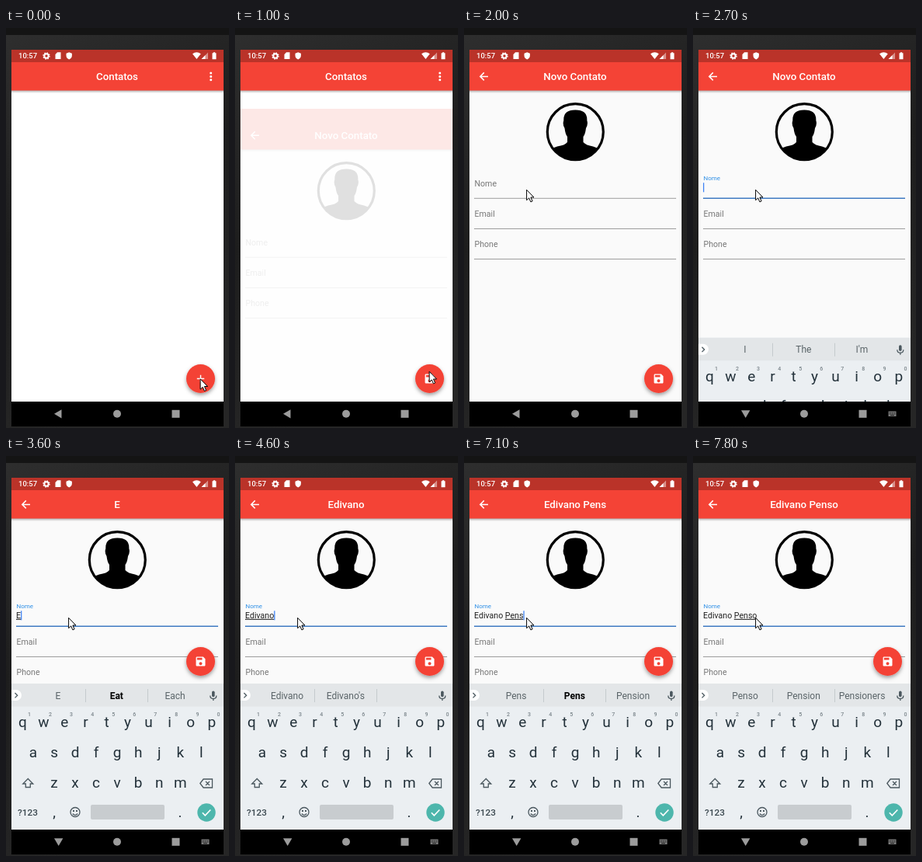
An HTML page that plays this animation: 287 by 515 pixels, repeating every 8 s.

```html
<!DOCTYPE html>
<html lang="pt">
<head>
<meta charset="utf-8">
<title>Contatos</title>
<style>
html, body { margin: 0; width: 100%; height: 100%; overflow: hidden; background: #1b1b1b }
svg { display: block; width: 287px; height: 515px; font-family: Roboto, sans-serif }
text { white-space: pre }
.mid { text-anchor: middle }
.title { font-size: 13.3px; font-weight: 500; fill: #fff; text-anchor: middle }
.field { font-size: 10.6px; fill: #777 }
.key { font-size: 19px; fill: #23313a; text-anchor: middle }
.digit { font-size: 7px; font-weight: 500; fill: #7b858b; text-anchor: middle }
.hint { font-size: 12px; fill: #5a6468; text-anchor: middle }
.line { fill: none; stroke: #4b585f; stroke-width: 1.3 }
#word { text-decoration: underline; text-decoration-thickness: 1px }
</style>
</head>
<body>
<svg viewBox="0 0 287 515">
  <defs>
    <linearGradient id="metal" x1="0" y1="0" x2=".3" y2="1">
      <stop stop-color="#2e2e2e"/><stop offset=".5" stop-color="#1d1d1d"/><stop offset="1" stop-color="#262626"/>
    </linearGradient>
    <linearGradient id="barShade" x2="0" y2="1">
      <stop stop-opacity=".32"/><stop offset="1" stop-opacity="0"/>
    </linearGradient>
    <clipPath id="screen"><path d="M7 28h273v485H7z"/></clipPath>
    <clipPath id="portrait"><circle cx="143.3" cy="133.7" r="36.5"/></clipPath>
    <filter id="drop" x="-50%" y="-50%" width="200%" height="200%">
      <feDropShadow dx="0" dy="2.5" stdDeviation="2.4" flood-opacity=".38"/>
    </filter>
  </defs>

  <path d="M0 0h287v515H0z" fill="#141414"/>
  <path d="M0 9h287v506H0z" fill="url(#metal)"/>

  <g clip-path="url(#screen)">
    <path d="M7 28h273v453H7z" fill="#fff"/>
    <path d="M7 80h273v4H7z" fill="url(#barShade)"/>
    <path d="M7 28h273v52.5H7z" fill="#f44336"/>
    <text class="title" x="143" y="67">Contatos</text>
    <g fill="#fff"><circle cx="263.7" cy="58" r="1.5"/><circle cx="263.7" cy="62.4" r="1.5"/><circle cx="263.7" cy="66.8" r="1.5"/></g>

    <g id="form">
      <path d="M7 28h273v453H7z" fill="#fafafa"/>
      <path d="M7 80h273v4H7z" fill="url(#barShade)"/>
      <path d="M7 28h273v52.5H7z" fill="#f44336"/>
      <path d="M31 62.4H21M25.8 57.4l-5 5 5 5" fill="none" stroke="#fff" stroke-width="1.5"/>
      <text class="title" id="title" x="143" y="67"></text>
      <g clip-path="url(#portrait)">
        <path d="M128.3 119Q127.500 105.500 143.300 105.500T158.300 119Q160 124 157 129Q156 137 153.500 140V147Q157 151 166 152.500Q175 154.500 177 163V175H109V163Q111 154.500 120 152.500Q130 151 133 147V140Q130.500 137 129.500 129Q126.500 124 128.300 119Z"/>
      </g>
      <circle cx="143.3" cy="133.7" r="36" fill="none" stroke="#000" stroke-width="3.2"/>
      <text class="field" id="label" x="13.5"></text>
      <text class="field" x="13.5" y="243">Email</text>
      <text class="field" x="13.5" y="282">Phone</text>
      <path d="M13 258.500h260M13 297.500h260" stroke="#949494" stroke-width=".9"/>
      <path id="rule" d="M13 219.300h260"/>
      <text class="field" id="typed" x="13" y="208.800" style="fill:#222"><tspan id="done"></tspan><tspan id="word"></tspan></text>
      <rect id="caret" y="199.300" width="1.3" height="12" fill="#4285f4"/>
    </g>

    <g id="fab">
      <circle r="18.500" fill="#f44336" filter="url(#drop)"/>
      <path id="plus" d="M-4.700 0h9.400M0-4.700v9.400" stroke="#fff" stroke-width="1.4"/>
      <path id="save" transform="scale(.664) translate(-12 -12)" fill="#fff" d="M17 3H5c-1.110 0-2 .9-2 2v14c0 1.100.89 2 2 2h14c1.100 0 2-.9 2-2V7l-4-4zm-5 16c-1.660 0-3-1.340-3-3s1.340-3 3-3 3 1.340 3 3-1.340 3-3 3zm3-10H5V5h10v4z"/>
    </g>

    <path d="M7 28h273v16H7z" fill="#000" opacity=".24"/>
    <g fill="#fff">
      <text x="16" y="39.400" font-size="9.500" font-weight="500">10:57</text>
      <g fill="none" stroke="#fff"><circle cx="52" cy="36" r="2.700" stroke-width="2"/><circle cx="52" cy="36" r="4" stroke-width="1.400" stroke-dasharray="1.600 1.540"/></g>
      <path d="M63.500 40V34l2.600-2.700H70.500V40zM77.500 32.700l3.700-1.500 3.700 1.500v2.800q0 3.300-3.700 5q-3.700-1.700-3.700-5z"/>
      <path d="M240 33.200q5.400-4 10.800 0l-5.400 6.800zM256.500 35v5h-5zM265.500 32.200h1.300v-1h2.400v1h1.300v8h-5z"/>
      <path d="M260 31.500V40h-8.500z" opacity=".45"/>
    </g>

    <g id="keyboard">
      <path d="M7 293h273v188H7z" fill="#ebeff2"/>
      <path d="M7 293h273v29.500H7z" fill="#e3e6e8"/>
      <path d="M7 301h6a7 7 0 0 1 0 14H7z" fill="#fff"/>
      <path class="line" d="M11.500 305l3.200 3.200-3.200 3.200"/>
      <path d="M102.500 300v17M182.500 300v17" stroke="#c5cacd"/>
      <text class="hint" x="67" y="312.600"></text>
      <text class="hint" x="142.300" y="312.600"></text>
      <text class="hint" x="217.500" y="312.600"></text>
      <path class="line" d="M262.800 308.500q0 4 4 4t4-4M266.800 312.500v2.500"/>
      <rect x="265" y="302.500" width="3.600" height="7.800" rx="1.800" fill="#4b585f"/>
      <g id="keys"></g>
      <path class="line" d="M28.300 415.500l-6.500 6.500h3.500v4.500h6V422h3.500z"/>
      <path class="line" d="M249.800 421.500l4.300-5.500h11.400v11h-11.400zM257 419l5 5M262 419l-5 5"/>
      <text class="mid" x="28" y="463" font-size="11.800" font-weight="500" fill="#38464d">?123</text>
      <circle class="line" cx="89" cy="458.500" r="6"/>
      <path class="line" d="M85.800 460.500q3.200 3.600 6.400 0"/>
      <path d="M86 456h2v2h-2zM90 456h2v2h-2z" fill="#4b585f"/>
      <rect x="109" y="449" width="95" height="19" rx="2" fill="#c8cccf"/>
      <circle cx="258" cy="459" r="11.700" fill="#4db6ac"/>
      <path d="M252.800 459.300l3.500 3.500 7-7.300" fill="none" stroke="#fff" stroke-width="1.600"/>
    </g>

    <path d="M7 481h273v32H7z"/>
    <g fill="#9c9c9c">
      <path id="back" d="M62 496.800l9.500-5.600v11.200z"/>
      <path id="hide" d="M62 492.300h11.400l-5.700 9.700z"/>
      <circle cx="143" cy="496.800" r="5"/>
      <path d="M213.500 491.800h10v10h-10z"/>
      <g id="switcher"><path d="M251.500 493.500h10v6.500h-10z" opacity=".8"/><path d="M252.500 495.300h8M252.500 497h8" stroke="#000" stroke-width=".8" stroke-dasharray="1 .7"/><path d="M254 498.700h5" stroke="#000" stroke-width=".8"/></g>
    </g>
  </g>
  <path id="pointer" d="M.6 .8V14.200L3.700 11.400L5.900 16.400L8.100 15.400L5.900 10.500H10z" fill="#fff" stroke="#000"/>
</svg>
<script>
const $ = id => document.getElementById(id);
const clamp = x => Math.min(1, Math.max(0, x));
const mix = (a, b, p) => a + (b - a) * p;
const smooth = p => p * p * (3 - 2 * p);
const show = (id, on) => $(id).setAttribute('visibility', on ? 'visible' : 'hidden');
const move = (id, x, y) => $(id).setAttribute('transform', `translate(${x} ${y})`);
const hints = document.querySelectorAll('.hint');

function bezier(x1, y1, x2, y2, x) {
  const at = (a, b, s) => 3 * (1 - s) * (1 - s) * s * a + 3 * (1 - s) * s * s * b + s * s * s;
  let lo = 0, hi = 1;
  for (let i = 0; i < 20; i++) {
    const s = (lo + hi) / 2;
    if (at(x1, x2, s) < x) lo = s; else hi = s;
  }
  return at(y1, y2, lo);
}

// Time, field text, three suggestions; a leading * marks the bold one
const typing = [
  [2400, '', 'I', 'The', "I'm"],
  [3600, 'E', 'E', '*Eat', 'Each'],
  [3900, 'Ed', 'Ed', '*Edit', 'Edge'],
  [4100, 'Edi', 'Edi', '*Edit', 'Edited'],
  [4200, 'Ediv', 'Ediv', '*Edit', 'Editions'],
  [4400, 'Ediva', 'Ediva', '*Edit', 'Editing'],
  [4500, 'Edivan', 'Edivan', 'Editing', 'Edit'],
  [4600, 'Edivano', 'Edivano', "Edivano's", ''],
  [5300, 'Edivano ', 'is', 'and', 'I'],
  [5700, 'Edivano P', 'P', '*Per', 'Part'],
  [6000, 'Edivano Pe', 'Pe', '*Peek', 'Pet'],
  [6200, 'Edivano Pen', 'Pen', '*Pen', 'Penny'],
  [7100, 'Edivano Pens', 'Pens', '*Pens', 'Pension'],
  [7300, 'Edivano Penso', 'Penso', 'Pension', 'Pensioners']
];

function addKey(char, x, y, cls = 'key') {
  $('keys').insertAdjacentHTML('beforeend', `<text class="${cls}" x="${x}" y="${y}">${char}</text>`);
}
[['qwertyuiop', 21.3, 349], ['asdfghjkl', 35, 387.5], ['zxcvbnm', 62, 426.5]].forEach(([row, x, y]) =>
  [...row].forEach((char, i) => addKey(char, x + i * 27.05, y)));
[...'1234567890'].forEach((char, i) => addKey(char, 30 + i * 27.05, 335, 'digit'));
addKey(',', 62, 465);
addKey('.', 224, 465);

function draw(t) {
  // New page slides up while fading in
  const p = clamp((t - 920) / 280);
  move('form', 0, 113 * (1 - bezier(.4, 0, .2, 1, p)));
  $('form').setAttribute('opacity', p ? bezier(.42, 0, 1, 1, p) : 0);
  show('plus', t < 900);
  show('save', t >= 900);

  // Field focus
  const focused = t >= 2300, float = clamp((t - 2200) / 300);
  $('label').textContent = 'Nome';
  $('label').setAttribute('y', mix(203.8, 195.8, float));
  $('label').style.fontSize = mix(10.6, 8, float) + 'px';
  $('label').style.fill = focused ? '#2e8fe6' : '#777';
  $('rule').setAttribute('stroke', focused ? '#3f7ac2' : '#949494');
  $('rule').setAttribute('stroke-width', focused ? 1.6 : .9);

  // Keyboard
  const open = t >= 2700;
  show('keyboard', open);
  show('hide', open);
  show('switcher', open);
  show('back', !open);
  move('keyboard', 0, 188 * (1 - clamp((t - 2600) / 400)) ** 2);
  move('fab', 250.5, t < 2800 ? 451.5 : 264.5);

  // Text, suggestions and caret
  const [since, text, ...words] = typing.filter(s => s[0] <= t).pop() || typing[0];
  const split = text.lastIndexOf(' ') + 1;
  $('title').textContent = text || 'Novo Contato';
  $('done').textContent = text.slice(0, split);
  $('word').textContent = text.slice(split);
  words.forEach((word, i) => {
    const bold = word[0] === '*';
    hints[i].textContent = word.replace('*', '');
    hints[i].style.fontWeight = bold ? 700 : 400;
    hints[i].style.fill = bold ? '#000' : '#5a6468';
  });
  show('caret', t >= 2400 && (t - since) % 1000 < 500);
  $('caret').setAttribute('x', 13 + (text ? $('typed').getComputedTextLength() : 0));

  // Mouse
  const travel = smooth(clamp((t - 1300) / 700));
  move('pointer', mix(249.5, 80, travel), mix(mix(451, 441.5, clamp(t / 200)), 207.5, travel));
}

function tick() {
  draw(Math.floor(performance.now() % 8000 / 100) * 100);
  requestAnimationFrame(tick);
}
tick();
</script>
</body>
</html>
```
